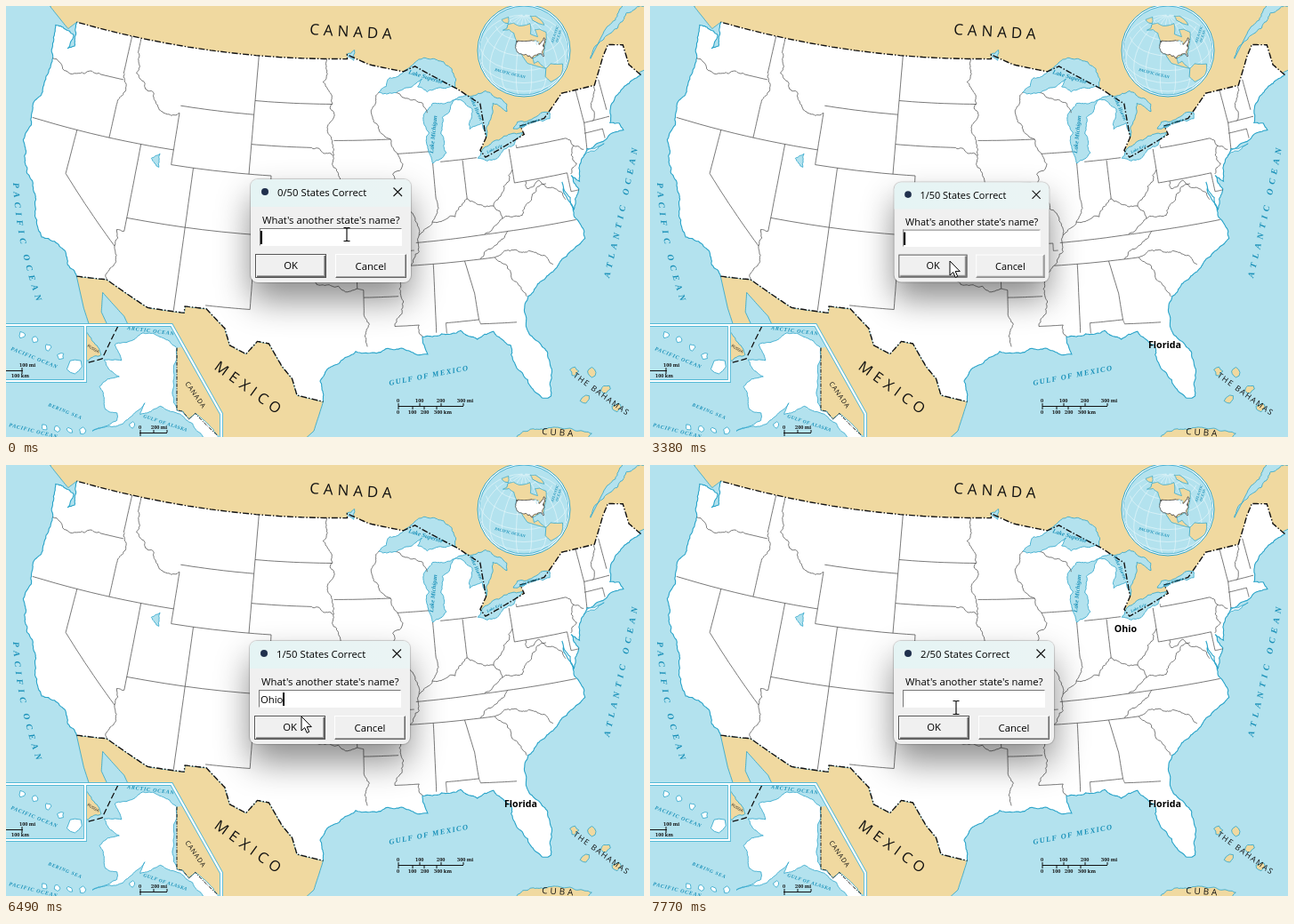
An HTML page for the animation above (8 s loop, 717 by 485 pixels).

```html
<!DOCTYPE html>
<html lang="en">
<head>
<meta charset="utf-8">
<title>States quiz</title>
<style>
html, body { margin: 0; width: 100%; height: 100%; overflow: hidden; background: #b3e2ee; }
#map, #pointer { position: absolute; left: 0; top: 0; }
#map { width: 717px; height: 485px; }
.sea { font-family: "Liberation Serif", serif; font-style: italic; font-weight: bold; fill: #1990b8; }
.land { font-family: "Open Sans", sans-serif; fill: #111; }
.scale { font: bold 5.6px "Noto Serif", serif; fill: #111; }
.found { font: bold 10.7px "Open Sans", sans-serif; text-anchor: middle; }
#states { fill: none; stroke: #4d4d4d; stroke-width: .75; stroke-linejoin: round; }
#borders { fill: none; stroke: #111; stroke-width: 1.4; stroke-dasharray: 7 2 1.5 2; }
#dialog { position: absolute; width: 180px; height: 116px; border-radius: 8px; background: #f0f0f0;
  box-shadow: 0 0 1px 1px rgba(0,0,0,.18), 0 20px 38px rgba(0,0,0,.45);
  font: 11.3px/16px "Open Sans", sans-serif; color: #000; white-space: pre; }
#dialog div { position: absolute; box-sizing: border-box; }
#bar { left: 0; top: 0; width: 180px; height: 31px; border-radius: 8px 8px 0 0; background: linear-gradient(90deg, #e5f4f4, #ebf4f4); }
#icon { left: 12px; top: 10px; width: 8px; height: 8px; border-radius: 50%; background: #20304d; }
#title { left: 30px; top: 7px; }
#ask { left: 13px; top: 38px; }
#entry { left: 10px; top: 55px; width: 160px; height: 20px; background: #fff; border: 1px solid #fff; border-top-color: #777; border-left-color: #777; }
#typed { left: 12px; top: 58px; height: 16px; }
#caret { display: inline-block; width: 2px; height: 15px; margin-left: -.8px; background: #000; vertical-align: top; }
.button { top: 84px; width: 80px; height: 27px; line-height: 25px; text-align: center; border: 1px solid; border-color: #fff #666 #666 #fff; box-shadow: inset -1px -1px #a5a5a5; }
#ok { left: 5px; line-height: 24px; border-color: #555; box-shadow: inset 1px 1px #fff, inset -1px -1px #696969, inset -2px -2px #a5a5a5; }
#cancel { left: 95px; }
#close { position: absolute; left: 160px; top: 9px; }
</style>
</head>
<body>
<svg id="map" viewBox="0 0 717 485">
  <defs>
    <path id="westArc" d="M8 199Q11 268 37 340"/>
    <path id="eastArc" d="M678 306Q695 236 712 150"/>
    <clipPath id="frame"><path d="M0 359H186L242 459V485H0Z"/></clipPath>
    <clipPath id="disc"><circle cx="582" cy="50" r="50"/></clipPath>
  </defs>
  <rect width="717" height="485" fill="#b3e2ee"/>
  <g id="base"></g>
  <g id="states"></g>
  <g id="borders"></g>

  <g class="land">
    <text font-size="17" letter-spacing="4.9" transform="translate(341 32) rotate(3.4)">CANADA</text>
    <text font-size="16.5" letter-spacing="5.3" transform="translate(233 408) rotate(36)">MEXICO</text>
    <text font-size="8.7" letter-spacing="1.5" transform="translate(637 417) rotate(36)">THE BAHAMAS</text>
    <text font-size="10" letter-spacing="3" transform="translate(602 482) rotate(4)">CUBA</text>
  </g>
  <g class="sea">
    <text font-size="9.8" letter-spacing="5.1"><textPath href="#westArc">PACIFIC OCEAN</textPath></text>
    <text font-size="9.8" letter-spacing="5"><textPath href="#eastArc">ATLANTIC OCEAN</textPath></text>
    <text font-size="8.4" letter-spacing="1.4" transform="translate(431 427) rotate(-11)">GULF OF MEXICO</text>
    <text font-size="6.8" transform="translate(452 76) rotate(17)">Lake Superior</text>
    <text font-size="6.8" transform="translate(480 166) rotate(-84)">Lake Michigan</text>
    <text font-size="5.6" transform="translate(521 103) rotate(66)">Lake Huron</text>
    <text font-size="4.6" transform="translate(541 166) rotate(-25)">Lake Erie</text>
    <text font-size="4.4" transform="translate(577 137) rotate(-19)">Lake Ontario</text>
  </g>

  <path d="M441 450.5H514M441 447V454M465 447V450M489 447V450M514 447V450M457 451V454M470 451V454M484 451V454" stroke="#111"/>
  <g class="scale">
    <text x="439" y="446">0</text><text x="460" y="446">100</text><text x="484" y="446">200</text><text x="507" y="446">300 mi</text>
    <text x="439" y="459">0</text><text x="452" y="459">100</text><text x="466" y="459">200</text><text x="481" y="459">300 km</text>
  </g>

  <g clip-path="url(#frame)">
    <rect y="355" width="245" height="130" fill="#b3e2ee"/>
    <g id="inset"></g>
    <path d="M126 360L118 376L108 397L90 402" fill="none" stroke="#111" stroke-width="1.3" stroke-dasharray="7 3"/>
    <rect y="359" width="89" height="63" fill="#b3e2ee"/>
    <g id="islands"></g>
    <g class="sea" font-size="6" letter-spacing=".8">
      <text transform="translate(136 364) rotate(7)">ARCTIC OCEAN</text>
      <text transform="translate(5 387) rotate(22)">PACIFIC OCEAN</text>
      <text transform="translate(47 450) rotate(22)" font-size="5.5">BERING SEA</text>
      <text transform="translate(3 473) rotate(14)">PACIFIC OCEAN</text>
      <text transform="translate(154 463) rotate(18)" font-size="5.5" letter-spacing=".4">GULF OF ALASKA</text>
    </g>
    <text class="land" font-size="7.5" letter-spacing=".8" transform="translate(201 425) rotate(55)">CANADA</text>
    <text class="land" font-size="4.4" transform="translate(91 383) rotate(32)">RUSSIA</text>
    <path d="M0 410.5H19M18 407V414M150 480.5H181M151 477V484M166 477V480M181 477V480" stroke="#111"/>
    <g class="scale"><text x="15" y="406">100 mi</text><text x="6" y="418">100 km</text><text x="149" y="476">0</text><text x="163" y="476">200 mi</text></g>
  </g>
  <g fill="none" id="rim"></g>

  <circle cx="582" cy="50" r="52" fill="#fff" stroke="#2aa4c9"/>
  <circle cx="582" cy="50" r="50" fill="#b3e2ee" stroke="#2aa4c9" stroke-width=".8"/>
  <g clip-path="url(#disc)">
    <g id="globe"></g>
    <text class="sea" font-size="4.6" transform="translate(549 73) rotate(14)">PACIFIC OCEAN</text>
    <text class="sea" font-size="4.2" transform="translate(615 42) rotate(-72)">ATLANTIC</text>
    <text class="sea" font-size="4.2" transform="translate(620 41) rotate(-72)">OCEAN</text>
  </g>

  <text class="found" id="florida" x="578.5" y="385">Florida</text>
  <text class="found" id="ohio" x="534.5" y="188">Ohio</text>
</svg>

<div id="dialog">
  <div id="bar"></div><div id="icon"></div><div id="title"></div>
  <svg id="close" width="11" height="11"><path d="M.5 .5L10 10M10 .5L.5 10" stroke="#111" stroke-width="1.1"/></svg>
  <div id="ask">What's another state's name?</div>
  <div id="entry"></div><div id="typed"><span id="word"></span><span id="caret"></span></div>
  <div id="ok" class="button">OK</div><div id="cancel" class="button">Cancel</div>
</div>

<svg id="pointer" width="24" height="28" viewBox="-8 -8 24 28" overflow="visible">
  <path id="arrow" d="M0 0V16L3.7 12.6L6.2 18.4L8.7 17.3L6.2 11.6H11.3Z" fill="#fff" stroke="#000"/>
  <path id="beam" d="M-3.5 -7.5H-1Q0 -7.5 0 -6.5Q0 -7.5 1 -7.5H3.5M0 -6.5V6.5M-3.5 7.5H-1Q0 7.5 0 6.5Q0 7.5 1 7.5H3.5" fill="none" stroke="#000" stroke-width="1.1"/>
</svg>

<script>
const $ = id => document.getElementById(id);
const TAN = '#f0d9a0', WATER = '#b3e2ee', SHORE = '#2aa4c9';
const rad = d => d * Math.PI / 180, mix = (a, b, k) => a + (b - a) * k;
let seed = 11;
const rand = () => (seed = seed * 16807 % 2147483647) / 2147483647;

// Projections take [degrees west, degrees north].
function albers(p1, p2, mid, kx, ky, x0, y0) {
  const s = Math.sin(rad(p1)), n = (s + Math.sin(rad(p2))) / 2, c = 1 - s * s + 2 * n * s;
  return ([lon, lat]) => {
    const r = Math.sqrt(c - 2 * n * Math.sin(rad(lat))) / n, a = n * rad(mid - lon);
    return [x0 + kx * r * Math.sin(a), y0 + ky * r * Math.cos(a)];
  };
}
function ortho(lon0, lat0, r, cx, cy) {
  const s = Math.sin(rad(lat0)), c = Math.cos(rad(lat0));
  return ([lon, lat]) => {
    const a = rad(lon0 - lon), u = Math.sin(rad(lat)), v = Math.cos(rad(lat));
    const x = v * Math.sin(a), y = c * u - s * v * Math.cos(a), front = s * u + c * v * Math.cos(a) > 0;
    const k = front ? r : r / Math.hypot(x, y);
    return [cx + k * x, cy - k * y];
  };
}
const main = albers(29.5, 45.5, 96, 962, 958, 374, -996);
const alaska = albers(55, 65, 141, 430, 430, 192, 208.7);
const world = ortho(110, 37, 50, 582, 50);

// Routes: "lon,lat" points; h and v follow a parallel or a meridian.
function walk(route) {
  let lon, lat;
  return route.split(' ').map(s => {
    if (s[0] == 'h') lon = +s.slice(1);
    else if (s[0] == 'v') lat = +s.slice(1);
    else [lon, lat] = s.split(',').map(Number);
    return [lon, lat];
  });
}
function smooth(route, proj = main) {
  const pts = walk(route), out = [proj(pts[0])];
  for (let i = 1; i < pts.length; i++)
    for (let k = 1; k <= 12; k++) out.push(proj(pts[i].map((v, j) => mix(pts[i - 1][j], v, k / 12))));
  return out;
}
// Midpoint displacement for shores and rivers
function split(a, b, amp) {
  const dx = b[0] - a[0], dy = b[1] - a[1];
  if (Math.hypot(dx, dy) < 2.6) return [b];
  const o = (rand() - .5) * amp, m = [(a[0] + b[0]) / 2 - dy * o, (a[1] + b[1]) / 2 + dx * o];
  return [...split(a, m, amp), ...split(m, b, amp)];
}
function rough(route, proj = main, amp = .28) {
  const pts = walk(route).map(proj);
  return pts.flatMap((p, i) => i ? split(pts[i - 1], p, amp) : [p]);
}

function add(layer, d, attrs = {}) {
  const el = document.createElementNS('http://www.w3.org/2000/svg', 'path');
  el.setAttribute('d', d);
  for (const k in attrs) el.setAttribute(k, attrs[k]);
  $(layer).append(el);
}
const trace = pts => 'M' + pts.map(p => p.map(v => v.toFixed(1)).join(' ')).join('L');
const area = (layer, pts, fill, stroke = SHORE) => add(layer, trace(pts) + 'Z', { fill, stroke, 'stroke-width': .8 });
function blob(layer, x, y, r, fill) {
  const pts = Array.from({ length: 9 }, (_, i) => {
    const a = i * Math.PI * 2 / 9, d = r * (.6 + .6 * rand());
    return [x + d * Math.cos(a), y + d * Math.sin(a)];
  });
  area(layer, pts, fill);
}

// Outline of the lower 48
const west = '122.75,49 122.5,48.2 122.3,47.4 122.9,47.1 122.7,48.1 124.7,48.4 124,46.2 124.1,44.5 124.5,42.8 124.1,41.5 124.4,40.4 123.7,39 122.5,37.8 121.9,36.6 120.6,34.5 118.5,34 117.1,32.5';
const south = '117.1,32.5 114.7,32.7 111.1,31.33 h108.2 v31.78 h106.5 104.9,30.6 104.4,29.5 103.1,29 102.3,29.9 101.4,29.8 100.3,28.3 99.5,27.5 99.1,26.4 97.15,26';
const gulf = '97.15,26 97.4,27.4 96.5,28.4 94.7,29.4 92.2,29.55 90.2,29.1 89.2,29 89.5,30.2 88,30.3 86.5,30.4 85.3,29.7 84,30.1 82.8,29 82.7,27.8 81.8,26.1 81.1,25.2 80.4,25.2';
const east = '80.4,25.2 80.05,26.8 81.4,30 80.9,32.1 79.3,33.1 78,33.9 76.5,34.7 75.5,35.2 76,36.9 76.4,39.2 75.9,37.2 75.1,38.5 75.5,39.5 74.9,39 74,40.6 73.6,41 71.4,41.5 70,41.6 70.2,42.1 71,42.3 70.7,43.1 68.8,44.4 67,44.8';
const lakes = '67,44.8 67.8,45.7 v47.1 69.2,47.4 70,46.7 71.5,45 h74.7 76.8,43.6 79.1,43.4 78.9,42.8 82.7,41.7 83.1,42.2 82.4,43 82.5,45.3 84.5,46.5 88.4,48.3 89.6,48 93,48.6 95.15,49.3';
const north = '95.15,49 h122.75';

// Neighbours
area('base', smooth('125.8,49.5 123.4,48.4 122.75,49 95,47 84,46 83,42 79,42.5 67,45 64,45.3 60,50 100,62'), TAN);
area('base', rough('71.2,46.8 69.5,47.8 66.5,49.1 64,49.1 v49.9 67,49.5 69.5,48.1'), WATER);
area('base', smooth(south + ' 97.8,24 100,22 112,22 110,27 112.8,30.5 114.8,31.8 114.6,30.5 112.5,28 114,27.5 116,30.5'), TAN);
area('base', rough('85,21.8 83.2,22.9 81.5,23.1 80,22.9 78,22.2 80,21'), TAN);
['78.4,26.6', '77.2,26.3', '78,24.6', '76.4,25', '75.9,23.6'].forEach(s => blob('base', ...main(walk(s)[0]), 5, TAN));

const shores = [west, gulf, east].map(s => rough(s, main, .24));
add('base', trace([...shores[0], ...smooth(south), ...shores[1], ...shores[2], ...smooth(lakes), ...smooth(north)]) + 'Z', { fill: '#fff' });
shores.forEach(s => add('base', trace(s), { fill: 'none', stroke: SHORE, 'stroke-width': 1.1 }));
area('base', rough('74,40.6 72,41.05 73.6,40.9'), '#fff');

const water = [
  '92.1,46.7 90.4,46.6 87.8,47.4 88.3,46.9 87.4,46.5 85,46.7 84.6,46.5 84.8,47.9 86.5,48.7 88.3,48.6 89.4,48.1 92.1,46.7',
  '87.5,41.7 87.8,42.5 87.6,43.8 88,44.5 87,45.7 84.8,45.8 85.5,45 86.2,44.7 86.5,43.6 86.2,42.3 87.5,41.7',
  '84.8,45.8 81.8,46.1 80,45 80.1,44.5 81.3,45.2 81.7,44.2 82.4,43 82.6,44 83.8,43.7 83.3,45 84.8,45.8',
  '83.4,41.7 83,42.1 81.3,42.7 79,42.9 80,42.2 81.7,41.5 83.4,41.7',
  '79.8,43.3 79.3,43.7 77,44 76.2,43.9 76.3,43.5 79,43.3 79.8,43.3',
  '112.2,41.6 112.9,41.2 112.1,40.7 112.2,41.6',
  '95.2,49.3 94.4,49.6 94.5,48.9 95.2,49.3'
];
water.forEach(s => area('base', rough(s), WATER));

// Surveyed state lines
const plains = ['117,49 v46.4', '119,46 h116.9', '124.2,42 h111.05', '117,42 v44.3', '116.05,49 v48', '111.05,45 h104.05', '111.05,44.5 v41 h102.05 v37',
  '114.05,42 v36.1', '120,42 v39 114.6,35', '109.05,41 v31.4', '104.05,49 v41', '114.05,37 h94.6', '103.05,37 v32 h106.6', '103.05,36.5 h100 v34.5',
  '104.05,45.94 h96.6', '104.05,43 h98.5', '102.05,40 h95.3', '96.45,43.5 h91.2', '95.8,40.6 h91.7'];
const coastal = ['94.6,39.1 v36.5 h90.1 v36 h89.7', '94.6,36.5 94.5,33.6 94,33.5 v32', '94,33 h91.2', '91.6,31 h89.7', '90.65,42.5 h87.8', '87.5,41.7 v39.3',
  '86.8,41.75 h83.5', '84.8,41.7 v39.1', '80.5,42 v39.72 h75.8 v38.45 h75.1', '79.8,42.2 v42 h75.3', '89.5,36.5 83.7,36.6 h81.7 75.9,36.55', '90.1,35 h83.1',
  '88.2,35 88.4,30.4', '85.6,35 85.1,32.8 85,31', '87.6,30.3 v31 h85 84.9,30.7 82.1,30.5', '73.6,41 73.3,42.7 73.35,45', '73.3,42.73 h70.9', '73.5,42.04 h71.8 v41.4', '71,45.3 v43.2'];
// Lines along rivers and ridges
const inland = ['124,46.2 122.8,45.7 121.2,45.7 119,46', '117,44.3 116.5,45.6 116.9,46.4', '116.05,48 114.4,45.6 113.9,45.6 113,44.5 111.05,44.5',
  '114.05,36.1 114.7,36.1 114.6,35 114.3,34.2 114.7,32.7', '100,34.5 98.1,34.1 96.6,33.8 94.5,33.6', '98.5,43 96.5,42.5 95.9,41 95.3,40 94.6,39.1',
  '97.2,49 96.6,46 96.8,45.6 96.45,45.3 v42.5', '94,32 93.6,31.2 93.8,29.7',
  '92.1,46.7 92.8,45.6 92.7,44.7 91.2,43.5 90.2,41.8 91.4,40.2 90.2,38.8 89.2,37 90.1,35 91.1,33.5 90.9,32.3 91.6,31'];
const wooded = ['89.2,37 88,37.8 86,38 84.8,39.1 83.7,38.6 82.6,38.4 81.7,39.2 80.5,40.6', '90.4,46.6 88,45.8 87.6,45.1', '87.5,39.3 88,37.8', '75.3,42 74.7,41.4 75.1,40.8 74.8,40.2 75.5,39.6',
  '74.7,41.4 73.9,41', '72.5,42.7 72.3,43.7 71.5,45', '81.7,36.6 82.6,36 84.3,35', '83.1,35 82,33.5 81,32.1', '83.1,35 81,35.1 79.6,34.8 78.5,33.9',
  '83.7,36.6 82,37.5 82.6,38.4', '82,37.5 80.3,37.5 79.3,38.4 77.8,39.3', '79.5,39.7 v39.2 78.4,39.6 77,38.8 76.4,38', '89.7,31 89.5,30.2'];
[...plains, ...coastal].forEach(s => add('states', trace(smooth(s))));
[...inland, ...wooded].forEach(s => add('states', trace(rough(s, main, .36))));
[south, lakes + ' ' + north].forEach(s => add('borders', trace(smooth(s))));

// Insets
const yukon = '141,69.65 v60.3 139.2,60.1 137.5,58.9 135.5,59.7 130,56';
area('inset', smooth(yukon + ' 125,55 120,60 130,70', alaska), TAN, 'none');
area('inset', rough('169.8,66.1 173,64.4 180,65 v68.5 175,67.3 169.8,66.1', alaska), TAN);
area('inset', rough(yukon + ' 130.2,55 133.5,55.5 136.5,58.2 140,59.7 146,60.8 151.8,59.2 151,61 153.5,59.3 156,57.4 163.5,55 158,57.6 158.5,58.7 162,58.7 166,61.6 164.5,63.1 161,64 165,64.5 168,65.6 162,66.4 166.5,68.3 156.7,71.3 141,69.65', alaska, .2), '#fff');
add('inset', trace(smooth(yukon, alaska)), { fill: 'none', stroke: '#111', 'stroke-dasharray': '4 1.5 1 1.5' });
for (const lon of [153.5, 166, 169, 172, 175]) blob('inset', ...alaska([lon, mix(57.5, 52.5, (lon - 153) / 22)]), 3.5, '#fff');
for (let i = 0; i < 5; i++) blob('islands', 18 + 14.5 * i, 370 + 5 * i + i * i, i < 4 ? 3.6 : 9, '#fff');
[['#55b9d6', 4], ['#fff', 2.2]].forEach(([stroke, w]) => add('rim', 'M0 359H186L242 459V490M89 359V422H0', { stroke, 'stroke-width': w }));

// Globe
for (let d = 0; d < 200; d += 20) add('globe', trace(smooth(`${d + 20},-45 v88`, world)), { fill: 'none', stroke: '#e4f5f9', 'stroke-width': .7 });
for (let d = -30; d < 90; d += 20) add('globe', trace(smooth(`190,${d} h30`, world)), { fill: 'none', stroke: '#e4f5f9', 'stroke-width': .7 });
['168,65 156,71 128,70 82,73 94,58 80,52 78,62 65,60 56,52 66,44 75,36 81,26 84,30 97,26 96,19 90,21 87,16 80,8 95,16 105,20 113,31 124,42 125,49 135,58 152,60 165,55 160,60',
  '60,76 30,82 20,75 43,60 53,67', '80,8 72,12 50,0 45,-23 70,-20 81,-5', '170,66 180,69 200,70 200,60 180,63'].forEach(s => area('globe', smooth(s, world), TAN));
area('globe', smooth([west, south, gulf, east, lakes, north].join(' '), world), '#fff', '#333');
water.slice(0, 3).forEach(s => area('globe', smooth(s, world), WATER, 'none'));

// Timing
const LOOP = 8000;
const rounds = [
  { open: -310, shut: 2890, x: 275, y: 195, word: 'Florida', from: 950, pace: 145 },
  { open: 3250, shut: 6840, x: 274, y: 198, word: 'Ohio', from: 5060, pace: 215 },
  { open: 7090, shut: 9999, x: 274, y: 198, word: '', from: 9999, pace: 1 }
];
const glides = [
  { from: 290, to: 350, x: 383, y: 259 },
  { from: 2150, to: 2700, x: 337, y: 287 },
  { from: 3850, to: 4250, x: 362, y: 266 },
  { from: 6330, to: 6700, x: 318, y: 291 },
  { from: 7540, to: 7770, x: 344, y: 273 }
];
const progress = (t, from, to) => Math.min(1, Math.max(0, (t - from) / (to - from)));

function pointerAt(t) {
  let x = 383, y = 257;
  for (const g of glides) {
    const k = 1 - (1 - progress(t, g.from, g.to)) ** 2;
    x = mix(x, g.x, k);
    y = mix(y, g.y, k);
  }
  return [Math.round(x), Math.round(y)];
}

function drawDialog(t) {
  const n = rounds.findLastIndex(r => t >= r.open), r = rounds[n], box = $('dialog').style;
  const shown = progress(t, r.open, r.open + 200), gone = progress(t, r.shut, r.shut + 150);
  const alpha = Math.min(1, shown * 1.75) * (1 - gone) ** 2, zoom = .9 + .1 * shown - .14 * gone;
  box.left = r.x + 'px';
  box.top = r.y + 'px';
  box.opacity = alpha;
  box.transformOrigin = gone ? '45px 20px' : '16px 15px';
  box.transform = zoom < 1 ? `scale(${zoom})` : 'none';
  $('title').textContent = n + '/50 States Correct';
  $('word').textContent = r.word.slice(0, Math.max(0, Math.floor((t - r.from) / r.pace) + 1));
  $('caret').style.visibility = (t - r.open) % 900 < 600 ? '' : 'hidden';
  return alpha > 0;
}

function draw(t) {
  const open = drawDialog(t), [x, y] = pointerAt(t), beam = open && y < 274;
  $('florida').style.display = t >= 3250 ? '' : 'none';
  $('ohio').style.display = t >= 7060 ? '' : 'none';
  $('arrow').style.display = beam ? 'none' : '';
  $('beam').style.display = beam ? '' : 'none';
  $('pointer').style.transform = `translate(${x - 8}px, ${y - 8}px)`;
}

const start = performance.now();
function tick() {
  draw((performance.now() - start) % LOOP);
  requestAnimationFrame(tick);
}
tick();
</script>
</body>
</html>
```
